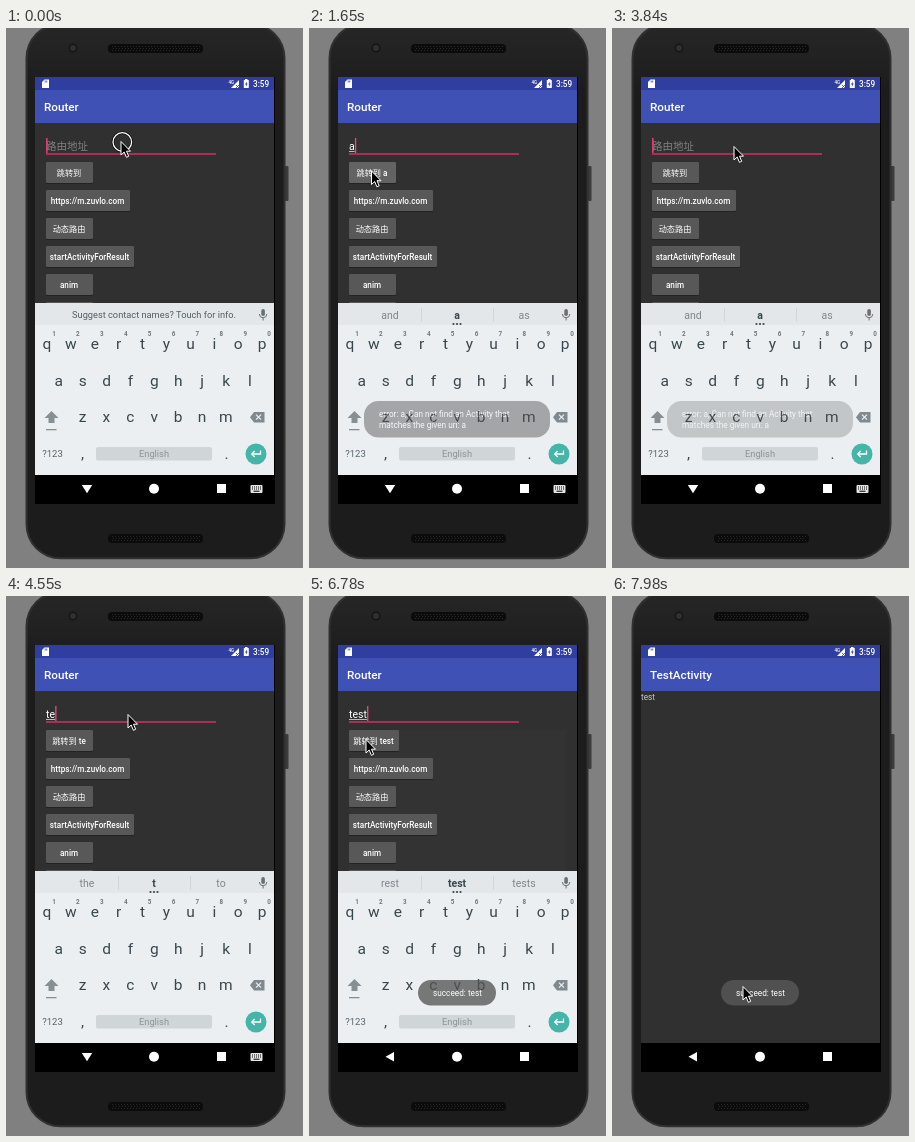
These frames come from a looping animation (297 by 540 pixels, 8 s). An HTML page with a canvas:

```html
<!DOCTYPE html>
<html lang="en">
<head>
<meta charset="utf-8">
<title>Router demo</title>
<style>
html, body { margin: 0; width: 100%; height: 100%; overflow: hidden; background: #808080; }
canvas { display: block; width: 297px; height: 540px; }
</style>
</head>
<body>
<canvas id="stage" width="297" height="540"></canvas>
<script>
const screen2d = document.getElementById('stage').getContext('2d');
const buffer = document.createElement('canvas');
buffer.width = 297;
buffer.height = 540;
const buffer2d = buffer.getContext('2d');
let ctx = screen2d;

const LOOP = 8000;
const FONT = 'Roboto, "Noto Sans CJK SC", "Noto Sans CJK", sans-serif';
const INK = '#37474f';

const clamp = v => Math.max(0, Math.min(1, v));
const ramp = (t, from, to) => clamp((t - from) / (to - from));
const within = (t, from, to) => t >= from && t < to;
const latest = (list, t) => list.filter(item => item[0] <= t).pop();

function rect(x, y, w, h, color, radius = 0) {
  ctx.fillStyle = color;
  ctx.beginPath();
  ctx.roundRect(x, y, w, h, radius);
  ctx.fill();
}
function disc(x, y, r, color) {
  ctx.fillStyle = color;
  ctx.beginPath();
  ctx.arc(x, y, r, 0, 7);
  ctx.fill();
}
function trace(points, close) {
  ctx.beginPath();
  points.forEach(([x, y]) => ctx.lineTo(x, y));
  if (close) ctx.closePath();
}
function poly(points, color) {
  trace(points, true);
  ctx.fillStyle = color;
  ctx.fill();
}
function line(points, color, width = 1) {
  trace(points);
  ctx.strokeStyle = color;
  ctx.lineWidth = width;
  ctx.stroke();
}
function text(str, x, y, size, color, align = 'left', weight = 400) {
  ctx.font = `${weight} ${size}px ${FONT}`;
  ctx.textAlign = align;
  ctx.fillStyle = color;
  ctx.fillText(str, x, y);
}
// Paints a group off screen, so that its parts fade as one.
function layer(alpha, dy, draw) {
  if (alpha <= 0) return;
  buffer2d.clearRect(0, 0, 297, 540);
  ctx = buffer2d;
  draw();
  ctx = screen2d;
  ctx.globalAlpha = alpha;
  ctx.drawImage(buffer, 0, dy);
  ctx.globalAlpha = 1;
}

// Timelines: [start, value...]
const TYPED = [[0, ''], [240, 'a'], [3780, ''], [4260, 't'], [4550, 'te'], [4720, 'tes'], [4900, 'test']];
const HINTS = [
  [0], [300, 'and', 'a', 'as'], [4370, 'the', 't', 'to'], [4630, 'to', 'te', 'the'],
  [4720, 'yes', 'tes', 'tea'], [5010, 'rest', 'test', 'tests']
];
const CARET_OFF = [[800, 1310], [1810, 2290], [2800, 3310], [5510, 6030]];
// [start, end, x, y]
const MOVES = [
  [0, 0, 114.5, 113], [680, 900, 62, 142.5], [2610, 2830, 121.5, 118],
  [5350, 5480, 64.5, 124], [5600, 5830, 56.5, 143], [7820, 7980, 130.5, 390]
];
const CLICKS = [[0, 60], [1310, 1470], [6030, 6200]];

function pointer(t) {
  let x = 0, y = 0;
  for (const [from, to, toX, toY] of MOVES) {
    if (t < from) break;
    const p = to > from ? ramp(t, from, to) : 1;
    x += (toX - x) * p;
    y += (toY - y) * p;
  }
  return [x, y];
}

function grille(y) {
  rect(102, y, 95, 9, '#0b0b0b', 4);
  for (let row = 0; row < 3; row++)
    for (let x = 106 + row % 2; x < 194; x += 3) rect(x, y + 2 + row * 2, 1, 1, '#292929');
}

function phone() {
  rect(0, 0, 297, 540, '#808080');
  rect(279, 138, 3.5, 35, '#3b3b3b', 1);
  rect(19.5, -5, 260, 536.3, '#303030', 35);
  const body = ctx.createLinearGradient(0, 0, 0, 540);
  body.addColorStop(0, '#262626');
  body.addColorStop(.12, '#1c1c1c');
  body.addColorStop(1, '#1c1c1c');
  rect(21.5, -3, 256, 532.3, body, 33);
  disc(67, 20, 4.5, '#151515');
  disc(67, 20, 3, '#303030');
  grille(16);
  grille(506);
  rect(29, 49, 240, 427, '#000');
}

function bars(title) {
  rect(29, 49, 239, 13, '#303f9f');
  rect(29, 62, 239, 33, '#3f51b5');
  text(title, 38, 83, 11.7, '#fff', 'left', 500);
}

function statusIcons() {
  poly([[38.5, 51.5], [43, 51.5], [43, 60], [36, 60], [36, 54]], '#fff');
  for (const x of [38.7, 40.4]) rect(x, 52.5, .8, 2, '#303f9f');
  text('4G', 222.5, 56, 4.5, '#fff', 'left', 500);
  poly([[233, 52], [233, 60], [225, 60]], '#fff');
  line([[230, 57], [233, 60]], '#303f9f', .8);
  line([[233, 57], [230, 60]], '#303f9f', .8);
  rect(239, 51, 2.5, 2, '#fff');
  rect(237.8, 52, 5, 8, '#fff', .6);
  poly([[240.8, 53.2], [239, 56.4], [240.2, 56.4], [239.8, 59], [241.7, 55.6], [240.5, 55.6]], '#303f9f');
  text('3:59', 247, 59, 8.2, '#fff', 'left', 500);
}

function button(label, y, width, color = '#585858') {
  rect(40, y + 1, width, 21, '#232323', 1.2);
  rect(40, y, width, 21, color, 1.2);
  text(label, 39.5 + width / 2, y + 14, 8.17, '#fff', 'center', 500);
}

function routerScreen(t) {
  const typed = latest(TYPED, t)[1];
  bars('Router');
  rect(29, 95, 239, 352, '#303030');
  if (within(t, 6750, 6850)) rect(40, 134, 217, 141, '#333');

  text(typed || '路由地址', 40, 121.5, 10.5, typed ? '#fff' : '#808080');
  const width = typed ? ctx.measureText(typed).width : 0;
  if (typed) rect(40, 123, width, .8, '#ddd');
  rect(40, 125.2, 170, 1.5, '#d22f68');
  if (!CARET_OFF.some(span => within(t, ...span))) rect(40.2 + width, 110, 1.3, 15, '#ff4081');

  const press = Math.max(ramp(t, 1310, 1400) - ramp(t, 1600, 1860), ramp(t, 6030, 6120) - ramp(t, 6200, 6310));
  const shade = Math.round(88 + 14 * press);
  button(typed ? '跳转到 ' + typed : '跳转到', 134, typed === 'test' ? 50 : 47, `rgb(${shade},${shade},${shade})`);
  button('https://m.zuvlo.com', 162, 84);
  button('动态路由', 190, 47);
  button('startActivityForResult', 218, 88);
  button('anim', 246, 47);
  button('', 274, 47);
}

function testScreen() {
  bars('TestActivity');
  rect(29, 95, 239, 352, '#303030');
  text('test', 29, 104, 8.17, '#c8c8c8');
}

function keyRow(keys, x, y) {
  [...keys].forEach((key, i) => text(key, x + i * 23.9, y, 15.5, INK, 'center'));
}

function suggestions(t) {
  const [, left, middle, right] = latest(HINTS, t);
  if (!middle) {
    text('Suggest contact names? Touch for info.', 148, 290, 9.25, '#525e64', 'center');
    return;
  }
  text(left, 81, 291, 10.5, '#7d878c', 'center');
  text(middle, 148, 291, 10.5, INK, 'center', 700);
  text(right, 215, 291, 10.5, '#7d878c', 'center');
  for (const x of [112, 184]) rect(x, 280, .8, 14, '#cdd2d4');
  for (const x of [144.5, 148, 151.5]) disc(x, 296, 1.1, INK);
}

function keyboard(t) {
  rect(29, 275, 239, 172, '#eceff1');
  rect(29, 275, 239, 22, '#e4e7e9');
  suggestions(t);

  rect(255.3, 281, 3.6, 7, '#677278', 1.8);
  ctx.strokeStyle = '#677278';
  ctx.lineWidth = 1;
  ctx.beginPath();
  ctx.arc(257.1, 286, 3.7, 0, Math.PI);
  ctx.stroke();
  rect(256.6, 289.5, 1, 3, '#677278');

  keyRow('qwertyuiop', 41, 321);
  keyRow('asdfghjkl', 52.8, 358);
  keyRow('zxcvbnm', 76.5, 394);
  [...'1234567890'].forEach((n, i) => text(n, 48 + i * 23.9, 308, 6.3, '#6b7980', 'center', 700));

  poly([[45.5, 383], [52.5, 390], [48.5, 390], [48.5, 395], [42.5, 395], [42.5, 390], [38.5, 390]], '#858f94');
  rect(40, 401, 10.5, 1.3, '#858f94');
  poly([[248, 384], [258.5, 384], [258.5, 394.5], [248, 394.5], [244, 389.2]], '#7f8a90');
  line([[250, 386.7], [255, 391.7]], '#eceff1', 1.2);
  line([[255, 386.7], [250, 391.7]], '#eceff1', 1.2);

  text('?123', 46.5, 429, 9.5, '#55646b', 'center');
  text(',', 76.5, 431, 15.5, INK, 'center');
  rect(90, 419, 116, 13.5, '#d0d5d7', 2);
  text('English', 148, 429, 9.3, '#8a9499', 'center');
  text('.', 220.5, 431, 15.5, INK, 'center');
  disc(250, 426, 10.5, '#45b5aa');
  line([[254.5, 422.5], [254.5, 426], [246, 426]], '#fff', 1.3);
  line([[248.7, 423], [245.7, 426], [248.7, 429]], '#fff', 1.3);
}

function navIcons(keyboardOpen) {
  if (keyboardOpen) {
    poly([[75.8, 457], [86.2, 457], [81, 465.3]], '#fff');
    rect(244.5, 457, 12, 8, '#e4e4e4', 1);
    for (let x = 246; x < 255; x += 2)
      for (const y of [458.5, 460.5]) rect(x, y, 1, 1, '#000');
    rect(247.5, 462.7, 6, 1, '#000');
  } else {
    poly([[76.5, 460.8], [85, 456], [85, 465.6]], '#fff');
  }
  disc(148, 460.8, 5, '#fff');
  rect(211, 456, 9, 9, '#fff');
}

function toast(lines, x, y, w, h, alpha) {
  layer(alpha, 0, () => {
    rect(x, y, w, h, 'rgba(82,82,82,.97)', Math.min(h / 2, 14.5));
    lines.forEach((str, i) => text(str, x + 15, y + 16 + i * 10.8, 8.25, '#fff'));
  });
}

function cursor(t) {
  const [x, y] = pointer(t);
  if (CLICKS.some(span => within(t, ...span))) {
    for (const [color, width] of [['#000', 2.6], ['#fff', 1.3]]) {
      ctx.strokeStyle = color;
      ctx.lineWidth = width;
      ctx.beginPath();
      ctx.arc(x + 1.8, y + 1, 9.3, 0, 7);
      ctx.stroke();
    }
  }
  ctx.save();
  ctx.translate(x, y);
  trace([[.5, .5], [.5, 14], [3.7, 11], [5.9, 16.3], [8.2, 15.3], [6, 10.2], [10, 10.2]], true);
  ctx.fillStyle = '#000';
  ctx.fill();
  ctx.strokeStyle = '#fff';
  ctx.lineWidth = 1;
  ctx.stroke();
  ctx.restore();
}

function draw(t) {
  phone();
  ctx.save();
  ctx.beginPath();
  ctx.rect(29, 49, 240, 420);
  ctx.clip();
  const enter = ramp(t, 6790, 7080);
  if (enter < 1) routerScreen(t);
  layer(clamp(enter / .39), 34 * (1 - enter) ** 3.5, testScreen);
  const hide = ramp(t, 6800, 6960);
  layer(1 - hide, 36 * hide, () => keyboard(t));
  ctx.restore();

  statusIcons();
  navIcons(t < 6700);
  toast(['error: a, Can not find an Activity that', 'matches the given uri: a'], 55, 373, 186, 36.5,
    ramp(t, 1460, 1860) - ramp(t, 3520, 3960));
  toast(['succeed: test'], 109, 384, 78, 25.5, ramp(t, 6600, 6830));
  cursor(t);
}

function frame() {
  draw(performance.now() % LOOP);
  requestAnimationFrame(frame);
}
frame();
</script>
</body>
</html>
```
